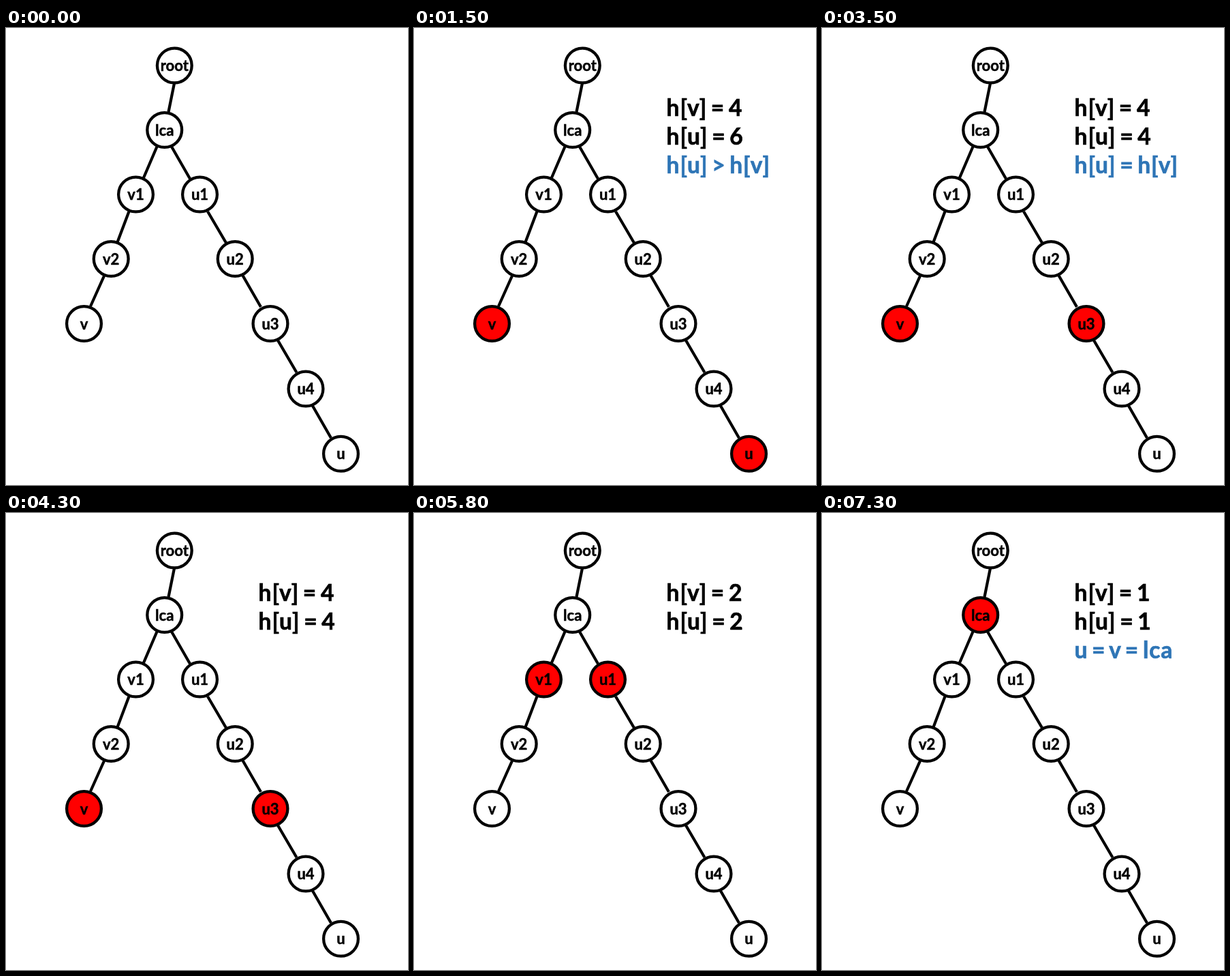
Animation, 590 px wide and 670 px high, one loop 8.3 s. Source, as an HTML page:

```html
<!DOCTYPE html>
<html lang="en">
<head>
<meta charset="utf-8">
<title>Lowest common ancestor</title>
<style>
  html, body { margin: 0; width: 100%; height: 100%; overflow: hidden; background: #fff; }
  svg { display: block; }
  text {
    font: bold 33.5px Lato, "Open Sans", sans-serif; white-space: pre;
    letter-spacing: 1px; word-spacing: -3.5px; stroke: #000; stroke-width: .7;
  }
  circle { fill: #fff; stroke: #000; stroke-width: 4.3; }
  circle.on { fill: #f00; }
  path { stroke: #000; stroke-width: 4.2; fill: none; }
  .label { font-size: 22px; letter-spacing: 0; text-anchor: middle; stroke-width: .5; }
  #note { fill: #2e75b6; stroke: #2e75b6; }
</style>
</head>
<body>
<svg width="590" height="670" viewBox="0 0 590 670">
  <path d="M247 81L238.5 123 M221.5 174L202 219.5 M180.5 269L163.5 314 M144 363.5L124 408
           M243 174L270 221 M296 269L323 315 M347.5 363L374 409 M399 458L426.5 505 M450 554L477 601"/>
  <g id="tree"></g>
  <text id="hv" x="370.5" y="128.5"></text>
  <text id="hu" x="370.5" y="170.5"></text>
  <text id="note" x="370.5" y="212.5"></text>
</svg>
<script>
const LOOP = 8300;
const nodes = {
  root: [247.3, 55], lca: [232.7, 149.5],
  v1: [190.5, 244], v2: [154.2, 338.5], v: [114.5, 433.5],
  u1: [284.5, 244], u2: [336.2, 338.5], u3: [388, 433.5], u4: [440, 529], u: [491.5, 624.3]
};
// Each step: start time, note time, note end, node v, node u, h[v], h[u], note
const steps = [
  [1000, 1500, 2000, 'v', 'u', 4, 6, 'h[u] > h[v]'],
  [2000, 2500, 3000, 'v', 'u4', 4, 5, 'h[u] > h[v]'],
  [3000, 3500, 4300, 'v', 'u3', 4, 4, 'h[u] = h[v]'],
  [4800, 5300, 5800, 'v2', 'u2', 3, 3, 'u ≠ v'],
  [5800, 6300, 6800, 'v1', 'u1', 2, 2, 'u ≠ v'],
  [6800, 7300, LOOP, 'lca', 'lca', 1, 1, 'u = v = lca']
];

const byId = id => document.getElementById(id);
const setText = (id, value) => { byId(id).textContent = value; };

byId('tree').innerHTML = Object.entries(nodes).map(([name, [x, y]]) =>
  `<circle id="node-${name}" cx="${x}" cy="${y}" r="25.4"/>
   <text class="label" x="${x}" y="${y + 8}">${name}</text>`).join('');

function draw(t) {
  const step = steps.findLast(s => t >= s[0]);
  const [, from, to, v, u, hv, hu, note] = step || [];
  for (const name in nodes)
    byId('node-' + name).classList.toggle('on', name === v || name === u);
  setText('hv', step ? `h[v] = ${hv}` : '');
  setText('hu', step ? `h[u] = ${hu}` : '');
  setText('note', t >= from && t < to ? note : '');
}

const start = performance.now();
function tick() {
  draw((performance.now() - start) % LOOP);
  requestAnimationFrame(tick);
}
tick();
</script>
</body>
</html>
```
